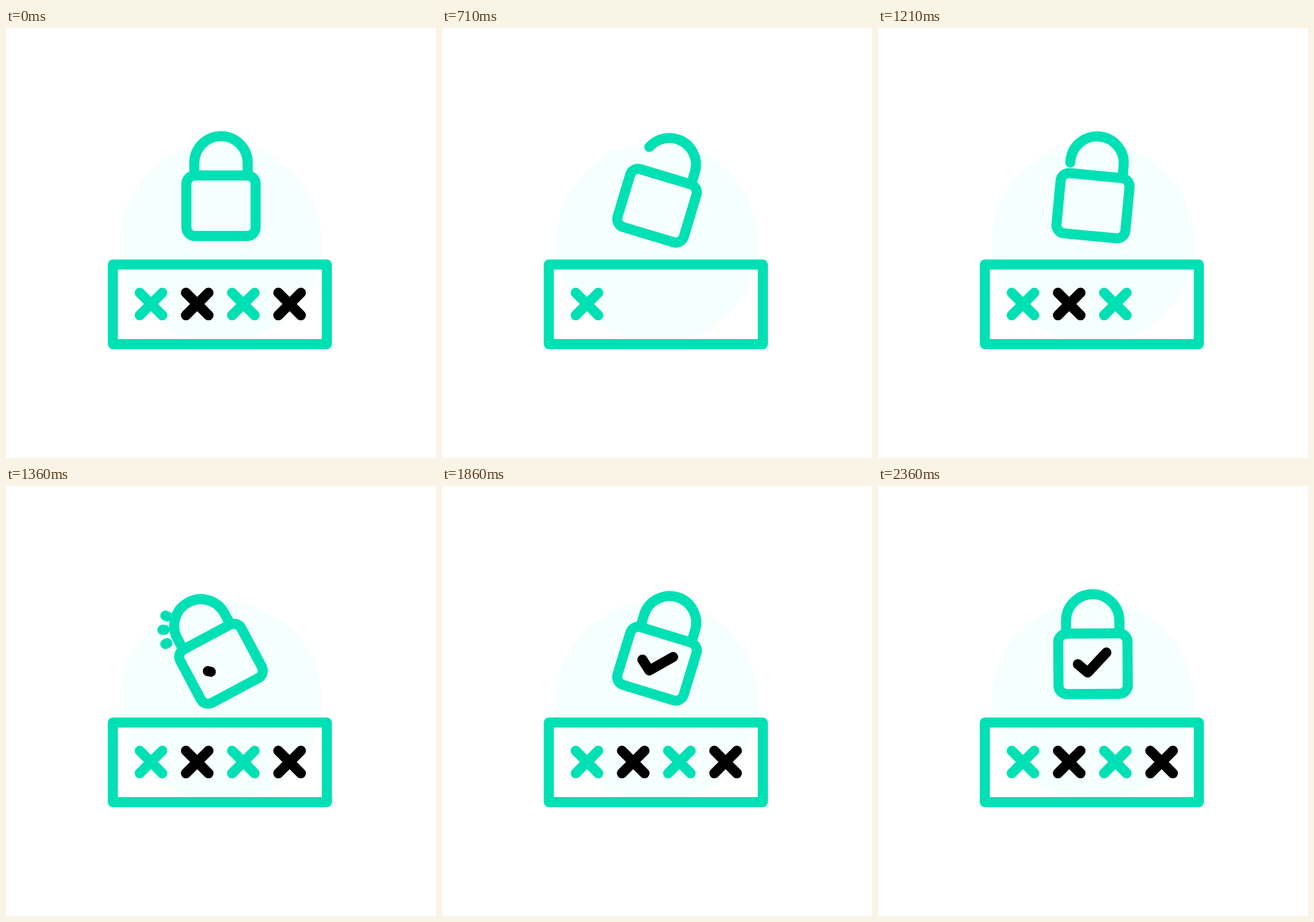
These frames come from a looping animation (640 px wide and 640 px high, 2.43 s). An HTML page:

```html
<!DOCTYPE html>
<html lang="en">
<head>
<meta charset="utf-8">
<title>Password lock</title>
<style>
  html, body { margin: 0; width: 100%; height: 100%; overflow: hidden; background: #fff; }
  svg { display: block; width: 100vw; height: 100vh; }
  .line { fill: none; stroke: #00e0b5; stroke-width: 15; stroke-linecap: round; stroke-linejoin: round; }
  .dark { stroke: #000; }
</style>
</head>
<body>
<svg viewBox="0 0 640 640">
  <circle cx="320" cy="320" r="150" fill="#f5fffd"/>
  <rect class="line" x="159" y="352" width="318.5" height="118.5"/>
  <g id="marks">
    <path class="line" d="M199 394l33.6 33.6m0-33.6l-33.6 33.6"/>
    <path class="line dark" d="M267.8 394l33.6 33.6m0-33.6l-33.6 33.6"/>
    <path class="line" d="M336.5 394l33.6 33.6m0-33.6l-33.6 33.6"/>
    <path class="line dark" d="M405.3 394l33.6 33.6m0-33.6l-33.6 33.6"/>
  </g>
  <g id="sparks">
    <path class="line"/>
    <path class="line"/>
    <path class="line"/>
  </g>
  <g id="lock">
    <path id="shackle" class="line" pathLength="1" d="M359.7 219.5V200.7A39.7 39.7 0 0 0 280.3 200.7V219.5"/>
    <rect class="line" x="268.5" y="219.5" width="103" height="90" rx="12.5"/>
    <path id="check" class="line dark" pathLength="1" d="M297.5 265L312 277.5L340 248"/>
  </g>
</svg>
<script>
const LOOP = 2430, STEPS = 34;
const $ = id => document.getElementById(id);
const lock = $('lock'), shackle = $('shackle'), check = $('check');
const marks = [...$('marks').children], sparks = [...$('sparks').children];

// All times below are counted in steps of the loop.
const swing = [[6.3, 0], [14.36, 38], [20, -34], [26, 17], [30.3, -9], [33.4, 0]];
const hidden = [[11, 12], [8, 14], [6, 16], [4, 18]];

function ease(t, from, to) {
  const x = Math.min(1, Math.max(0, (t - from) / (to - from)));
  return x * x * (3 - 2 * x);
}

function track(t, keys) {
  let value = keys[0][1];
  for (let i = 1; i < keys.length; i++) {
    value += (keys[i][1] - keys[i - 1][1]) * ease(t, keys[i - 1][0], keys[i][0]);
  }
  return value;
}

function show(el, on) {
  el.style.visibility = on ? 'visible' : 'hidden';
}

function drawSparks(t) {
  const head = ease(t, 18.36, 21.4), tail = ease(t, 18.4, 25);
  sparks.forEach((el, i) => {
    const side = i - 1;
    const reach = side ? 34 : 37.2;
    const startX = side ? 241 : 237;
    const point = k => `${startX - reach * k} ${214 + side * (19.5 + 14.5 * k)}`;
    el.setAttribute('d', `M${point(tail)}L${point(head)}`);
    show(el, head - tail > 0.001);
  });
}

function draw(t) {
  lock.setAttribute('transform', `rotate(${track(t, swing)} 320 264.5)`);

  const open = 0.41 * (ease(t, 6.3, 13.3) - ease(t, 14.4, 18.2));
  shackle.setAttribute('stroke-dasharray', `${1 - open} 2`);

  const drawn = ease(t, 18.2, 22.9);
  check.setAttribute('stroke-dasharray', `${drawn} 2`);
  show(check, drawn > 0);

  marks.forEach((el, i) => show(el, t < hidden[i][0] || t >= hidden[i][1]));
  drawSparks(t);
}

const start = performance.now();
function tick() {
  const ms = (performance.now() - start) % LOOP;
  draw(Math.min(STEPS - 1, Math.floor((ms + 5) * STEPS / LOOP)));
  requestAnimationFrame(tick);
}
tick();
</script>
</body>
</html>
```
